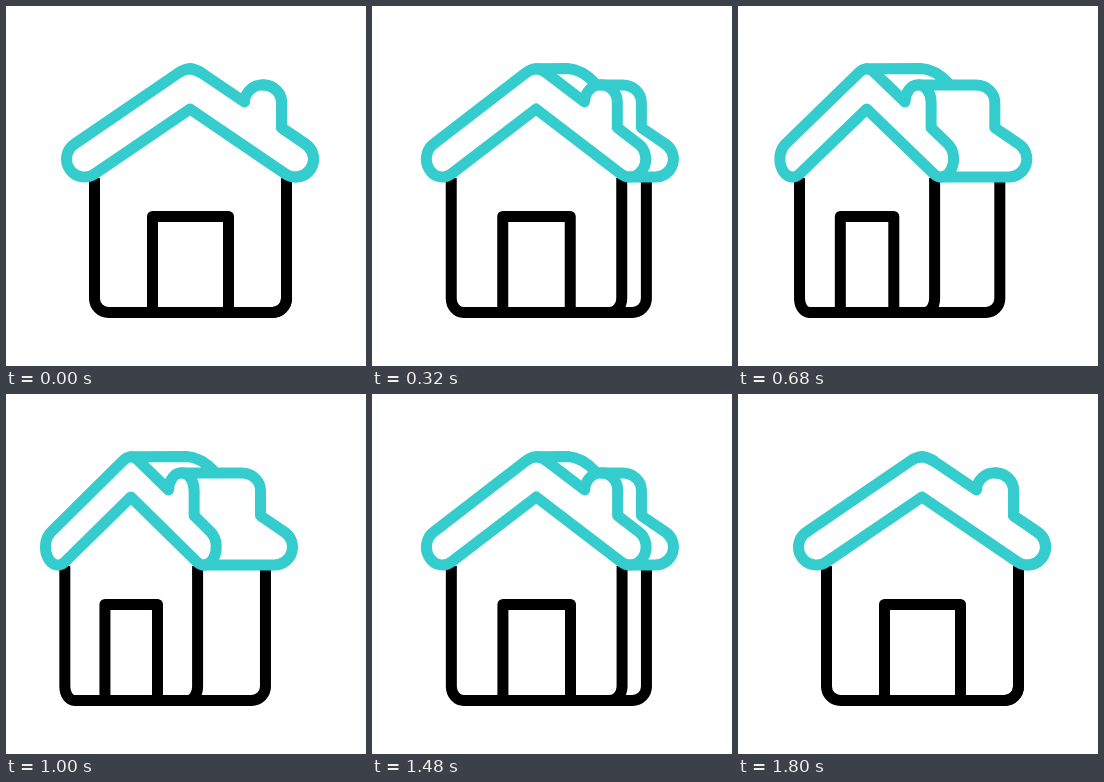
An HTML page for the animation above (1.82 s loop, 360x360 px).

```html
<!DOCTYPE html>
<html lang="en">
<head>
<meta charset="utf-8">
<title>Turning house</title>
<style>
  html, body { margin: 0; width: 100%; height: 100%; overflow: hidden; background: #fff; }
  svg { display: block; width: 360px; height: 360px; }
  path {
    fill: none; stroke: #000; stroke-width: 11;
    stroke-linejoin: round; stroke-linecap: round;
    vector-effect: non-scaling-stroke;
  }
  .wall { stroke-linecap: butt; }
  .roof { stroke: #35ccce; }
</style>
</head>
<body>
<svg>
  <g id="house">
    <path id="backWall" class="wall"/>
    <g class="front">
      <path class="wall" d="M88.5 172V292.5A14 14 0 0 0 102.5 306.5H266.5A14 14 0 0 0 280.5 292.5V172"/>
      <path class="wall" d="M146.5 306.5V210.5H222.5V306.5"/>
    </g>
    <path id="backRoof" class="roof"/>
    <g class="front">
      <path class="roof" d="M172 67.2Q184 58.5 196 67.2L238.5 96A18.5 17.5 0 0 1 275.5 96.5V121.7
        L299.6 138.1A18 18 0 0 1 279.4 167.9L184 103L88.6 167.9A18 18 0 0 1 68.4 138.1Z"/>
    </g>
  </g>
</svg>
<script>
const LOOP = 1820, HALF = 900, TURN = 780;
const LEFT = 60.5;  // edge the front face shrinks towards
const byId = id => document.getElementById(id);
const fronts = document.querySelectorAll('.front');
const ease = x => (1 - Math.cos(Math.PI * Math.min(1, x))) / 2;
const mix = (a, b, k) => a + (b - a) * k;

function draw(now) {
  const t = now % LOOP;
  const m = Math.max(0, Math.min(t, 2 * HALF - t));
  const turn = ease(m / TURN);
  const scale = 1 - 0.3085 * turn;
  const front = x => mix(LEFT, x, scale);
  const ridge = Math.min(1, turn * 3);
  const r = (a, b) => mix(a, b, ridge);

  byId('house').setAttribute('transform', `translate(${-21.7 * ease(m / HALF)} 0)`);
  for (const g of fronts)
    g.setAttribute('transform', `translate(${LEFT * (1 - scale)} 0) scale(${scale} 1)`);

  byId('backWall').setAttribute('d',
    `M${front(266.5)} 306.5H266.5A14 14 0 0 0 280.5 292.5V172`);
  byId('backRoof').setAttribute('d',
    `M${front(184)} 62.8L${r(184, 202)} 62.5Q${r(190, 216)} ${r(64, 63.5)} ${r(196, 229)} ${r(67.2, 77)}` +
    `M${front(257)} 79H257A18.5 17.5 0 0 1 275.5 96.5V121.7L299.6 138.1` +
    `A18 18 0 0 1 289.5 171H${front(289.5)}`);
}

const start = performance.now();
function tick() {
  draw(performance.now() - start);
  requestAnimationFrame(tick);
}
tick();
</script>
</body>
</html>
```
